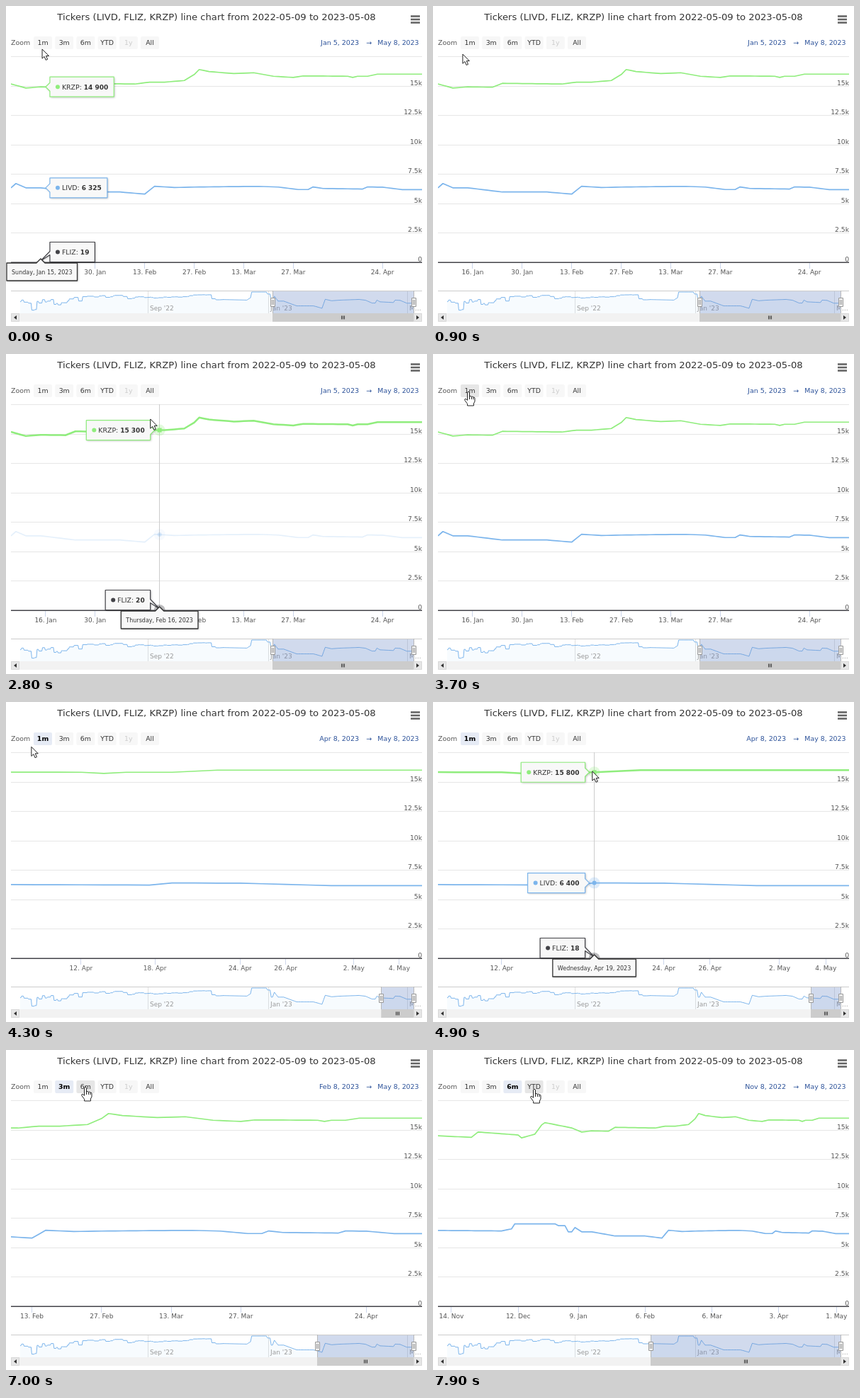
Write an HTML page with a canvas that moves like this. It is 594x452 px and loops after 8000 ms.

```html
<!DOCTYPE html>
<html lang="en">
<head>
<meta charset="utf-8">
<title>Ticker line chart</title>
<style>
html, body { margin: 0; width: 100%; height: 100%; overflow: hidden; background: #fff; }
canvas { display: block; width: 594px; height: 452px; }
</style>
</head>
<body>
<canvas id="c"></canvas>
<script>
const W = 594, H = 452, LOOP = 8000;
const L = 7, R = 587, TOP = 71, BASE = 362, FIRST = -40, LAST = 83;
const NAV_L = 20, NAV_R = 575, NAV_B = 434;
const FONT = '"DejaVu Sans", sans-serif';
const GREEN = '#90ed7d', BLUE = '#7cb5ec', DARK = '#434348';
const canvas = document.getElementById('c');
const g = canvas.getContext('2d');
const dpr = window.devicePixelRatio || 1;
canvas.width = W * dpr;
canvas.height = H * dpr;

const lerp = (a, b, p) => a + (b - a) * p;
const clamp = (v, lo, hi) => Math.max(lo, Math.min(hi, v));

// Calendar: days count from 5 January 2023, a Thursday
const FROM = -58, TO = 123;
const holidays = [-10, -3, 95, 103, 106, 116];
const isOpen = d => ((d + 74) % 7) < 5 && !holidays.includes(d);
const range = (a, b, step = 1) => Array.from({ length: Math.floor((b - a) / step) + 1 }, (_, k) => a + k * step);
const openDays = range(FROM, TO).filter(isOpen);
const fmt = (d, o) => new Date(Date.UTC(2023, 0, 5 + d)).toLocaleDateString('en-US', { timeZone: 'UTC', ...o });
const dayMonth = d => fmt(d, { day: 'numeric' }) + '. ' + fmt(d, { month: 'short' });
const shortDate = d => fmt(d, { month: 'short', day: 'numeric', year: 'numeric' });
const longDate = d => fmt(d, { weekday: 'long' }) + ', ' + shortDate(d);

// Trading-day index; closed days fall just after the day before
function indexOf(d) {
  const before = openDays.filter(o => o <= d).length - 1 + FIRST;
  return isOpen(d) ? before : before + .25;
}

const fortnights = range(11, TO, 14).filter(isOpen);
const views = [
  { at: -9999, from: 0, nav: 376, btn: -1, ticks: fortnights },
  { at: 3850, from: 93, nav: 533, btn: 0, ticks: [97, 103, 109, 111, 117, 119, 123] },
  { at: 5832, from: 34, nav: 439, btn: 1, ticks: fortnights },
  { at: 7050, from: FROM, nav: 307, btn: 2, ticks: range(-52, TO, 28) }
];
views.forEach(v => v.s = indexOf(v.from));

// turning points: index, price
const krzp = [[-40,14480], [-30,14350], [-28,14800], [-16,14550], [-15,14300], [-11,14620], [-9,15400],
  [-8,15600], [-3,15320], [0,15150], [3,14800], [6,14900], [11,14870], [13,15200], [25,15140], [28,15300],
  [31,15300], [35,15440], [37,15945], [38,16370], [40,16200], [45,16030], [49,16100], [53,15800],
  [57,15700], [59,15830], [68,15800], [69,15700], [70,15800], [72,15800], [74,15980], [83,15980]];
const livd = [[-40,6440], [-21,6400], [-18,6570], [-17,7000], [-5,7000], [-4,6850], [-2,6850], [-1,6320],
  [0,6320], [1,6690], [3,6325], [6,6325], [13,5970], [22,5970], [27,5790], [29,6460], [33,6350],
  [37,6390], [50,6450], [54,6390], [58,6180], [60,6180], [61,6400], [63,6270], [71,6220], [72,6400],
  [75,6380], [79,6170], [83,6170]];
// x, y of the overview before the longest zoom range
const early = [[20,418], [32,420], [35,431], [40,431], [43,418], [64,416], [70,422], [84,418], [92,413],
  [106,416], [110,408], [135,411], [158,408], [170,412], [250,411], [266,408], [285,408], [292,415], [307,415]];
// pointer: time, x, y
const track = [[0,51,61], [500,70,40], [1000,35,75], [1500,281,98], [2080,580,98], [2800,204,92],
  [3400,50,52], [4200,50,52], [4450,15,80], [4900,225,98], [5550,87,49], [6400,87,49], [6900,112,51],
  [7350,112,51], [7800,143,54], [8000,143,54]];
// times the pointer enters and leaves the plot
const visits = [[-1, 0], [945, 3110], [4380, 5266]];

// point on a polyline of [key, ...values]
function along(pts, key) {
  const k = Math.max(1, pts.findIndex(q => q[0] >= key));
  const a = pts[k - 1], b = pts[k], p = (key - a[0]) / (b[0] - a[0]);
  return a.map((v, n) => lerp(v, b[n], p)).slice(1);
}
const price = (data, i) => along(data, i)[0];
const pointer = t => along(track, clamp(t, 0, LOOP));
const yOf = v => BASE - v * 0.01663;
const step = v => (R - L) / (LAST - v.s);
const xOf = (i, v) => L + (i - v.s) * step(v);

function rng(seed) {
  return () => (seed = (seed * 16807) % 2147483647) / 2147483647;
}

function text(s, x, y, size, color, align = 'left', weight = '') {
  g.font = `${weight} ${size}px ${FONT}`;
  g.fillStyle = color;
  g.textAlign = align;
  g.fillText(s, x, y);
}

function line(pts, color, width = 1) {
  g.beginPath();
  pts.forEach(p => g.lineTo(p[0], p[1]));
  g.strokeStyle = color;
  g.lineWidth = width;
  g.stroke();
}
const vline = (x, y0, y1, color) => line([[Math.floor(x) + .5, y0], [Math.floor(x) + .5, y1]], color);

function polygon(pts) {
  const path = new Path2D();
  pts.forEach(q => path.lineTo(q[0], q[1]));
  path.closePath();
  return path;
}

function rect(x, y, w, h, fill, stroke) {
  g.fillStyle = fill;
  g.fillRect(x, y, w, h);
  if (!stroke) return;
  g.strokeStyle = stroke;
  g.lineWidth = 1;
  g.strokeRect(x + .5, y + .5, w - 1, h - 1);
}

function disc(x, y, r, color) {
  g.fillStyle = color;
  g.beginPath();
  g.arc(x, y, r, 0, 7);
  g.fill();
}

function header(t, view) {
  text('Tickers (LIVD, FLIZ, KRZP) line chart from 2022-05-09 to 2023-05-08', 297, 19.5, 13.15, '#333', 'center');
  for (const y of [14.5, 19, 23.5]) line([[571, y], [584, y]], '#666', 2.6);
  text('Zoom', L, 55, 9.4, '#555');
  const [mx, my] = pointer(t);
  let hand = false;
  ['1m', '3m', '6m', 'YTD', '1y', 'All'].forEach((b, k) => {
    const x = 39 + k * 30.2, on = view.btn === k, off = b === '1y';
    const over = !off && mx > x && mx < x + 26 && my > 43 && my < 60.5;
    hand = hand || over;
    g.fillStyle = on ? '#e6ebf5' : over ? '#e6e6e6' : '#f7f7f7';
    g.beginPath();
    g.roundRect(x, 43, 26, 18, 2);
    g.fill();
    text(b, x + 13, 55, 9.4, off ? '#ccc' : on ? '#000' : '#333', 'center', on ? 'bold' : '');
  });
  text(shortDate(view.from), 498, 55, 9.5, '#2b5199', 'right');
  text('→', 512, 55, 9.5, '#2b5199', 'center');
  text(shortDate(TO), 582.5, 55, 9.4, '#2b5199', 'right');
  return hand;
}

function axes(prev, view, p) {
  for (let v = 0; v <= 17500; v += 2500) {
    const y = Math.round(yOf(v)) + .5;
    line([[L, y], [R, y]], '#e6e6e6');
  }
  const tick = (d, alpha) => {
    const i = indexOf(d), x = lerp(xOf(i, prev), xOf(i, view), p);
    if (x < L - 1 || x > R + 1) return;
    g.globalAlpha = alpha;
    vline(x, BASE, BASE + 9, '#ccd6eb');
    text(dayMonth(d), clamp(x, 22, 572), 379, 9, '#555', 'center');
  };
  if (p < 1) prev.ticks.filter(d => !view.ticks.includes(d)).forEach(d => tick(d, 1 - p));
  view.ticks.forEach(d => tick(d, prev.ticks.includes(d) ? 1 : Math.max(0, 2 * p - 1)));
  g.globalAlpha = 1;
}

function series(data, color, width, prev, view, p) {
  // days left of a window wait at its first point
  const place = (i, v) => {
    const j = Math.max(i, Math.floor(v.s));
    return [xOf(j, v), yOf(price(data, j))];
  };
  line(range(FIRST, LAST).map(i => {
    const a = place(i, prev), b = place(i, view);
    return [lerp(a[0], b[0], p), lerp(a[1], b[1], p)];
  }), color, width);
}

// Overview: stepped random wiggle first, then the LIVD prices
function overviewPath() {
  const rand = rng(11), pts = [];
  for (let x = NAV_L; x < 300;) {
    const w = 2 + rand() * 5;
    const y = along(early, x)[0] + (rand() - .5) * lerp(7, 0, x / 300);
    pts.push([x, y], [x + w - 1, y]);
    x += w;
  }
  const scale = views.map(v => [v.s, v.nav]).concat([[LAST, NAV_R]]).sort((a, b) => a[0] - b[0]);
  for (let i = FIRST; i <= LAST; i++)
    pts.push([along(scale, i)[0], 404 + (7000 - price(livd, i)) * .019]);
  return pts;
}
const overview = overviewPath();

function navigator(x0) {
  const w = NAV_R - x0;
  line([[L, 402.5], [R, 402.5]], '#ccc');
  for (const x of [200, 370, 566]) vline(x, 403, NAV_B, '#e0e0e0');
  g.fillStyle = 'rgba(124,181,236,.06)';
  g.fill(polygon([...overview, [NAV_R, NAV_B], [NAV_L, NAV_B]]));
  line(overview, BLUE);
  text("Sep '22", 203, 430, 9, '#999');
  text("Jan '23", 373, 430, 9, '#999');
  text('M…', 569, 430, 9, '#999');
  rect(x0, 403, w, 31, 'rgba(102,133,194,.3)');
  rect(L, NAV_B, R - L, 12, '#f2f2f2');
  rect(x0, NAV_B, w, 12, '#ccc');
  for (const [x, d] of [[13, -2], [581, 2]]) {
    rect(x - 6, NAV_B, 12, 12, '#e6e6e6', '#d8d8d8');
    g.fillStyle = '#333';
    g.fill(polygon([[x + d, 440], [x - d, 437], [x - d, 443]]));
  }
  for (const d of [-2, 0, 2]) vline(x0 + w / 2 + d, 437.5, 442.5, '#333');
  for (const x of [Math.round(x0), NAV_R]) {
    vline(x, 402, NAV_B, '#b8b8b8');
    rect(x - 3, 412, 7, 13, '#f2f2f2', '#999');
    vline(x - 1, 415, 422, '#999');
    vline(x + 1, 415, 422, '#999');
  }
}

function panel(path, border, width) {
  g.save();
  g.shadowColor = 'rgba(0,0,0,.3)';
  g.shadowBlur = 3 * dpr;
  g.shadowOffsetX = g.shadowOffsetY = dpr;
  g.fillStyle = '#f8f8f8';
  g.fill(path);
  g.restore();
  g.strokeStyle = border;
  g.lineWidth = width;
  g.stroke(path);
}

function tag(name, value, color, x, y) {
  const label = name + ': ';
  const num = String(value).replace(/\B(?=(\d{3})+$)/g, ' ');
  g.font = `9.4px ${FONT}`;
  const lw = g.measureText(label).width;
  g.font = `bold 9px ${FONT}`;
  const w = 17 + lw + g.measureText(num).width + 8;
  const mid = Math.min(y, 347.5), low = mid < y;
  const left = x - 13 - w >= 0;
  const bx = left ? x - 13 - w : x + 13;
  const edge = left ? bx + w : bx, tip = left ? edge + 6 : edge - 6;
  const [a, b, c, d] = [[bx, mid - 14], [bx + w, mid - 14], [bx + w, mid + 14], [bx, mid + 14]];
  const notch = low ? [[edge, mid - 1], [x, BASE - 2], [edge, mid + 4]]
    : [[edge, mid - 6], [tip, mid], [edge, mid + 6]];
  panel(polygon(left ? [a, b, ...notch, c, d] : [a, b, c, d, ...notch.reverse()]), color, 1.2);
  disc(bx + 11, mid, 3, color);
  text(label, bx + 17, mid + 3.5, 9.4, '#333');
  text(num, bx + 17 + lw, mid + 3.5, 9, '#333', 'left', 'bold');
}

function dateTag(i, x) {
  const s = longDate(openDays[i - FIRST]);
  g.font = `8px ${FONT}`;
  const w = g.measureText(s).width + 14;
  const bx = clamp(x - w / 2, 1, W - w - 1), end = bx + w;
  const notch = [[x - 6, 363], [x, 357], [x + 6, 363]].map(q => [clamp(q[0], bx, end), q[1]]);
  panel(polygon([[bx, 363], ...notch, [end, 363], [end, 388], [bx, 388]]), '#333', 1.3);
  text(s, bx + 7, 378.5, 8, '#333');
}

function hover(t, view) {
  const visit = visits.find(([a, b]) => t >= a && t < b + 550);
  if (!visit) return null;
  const now = Math.min(t, visit[1]);
  const mx = pointer(now - 30)[0];
  const i = clamp(Math.round((mx - L) / step(view) + view.s), Math.ceil(view.s), LAST);
  const inside = t > visit[0] && t < visit[1];
  return {
    i, inside, x: xOf(i, view),
    green: Math.round(price(krzp, i) / 5) * 5,
    blue: Math.round(price(livd, i) / 5) * 5,
    dim: inside && view === views[0],
    back: view === views[0] && pointer(now)[0] < mx,
    alpha: clamp((visit[1] + 550 - t) / 100, 0, 1)
  };
}

function tooltip(h) {
  g.globalAlpha = h.alpha;
  tag('KRZP', h.green, GREEN, h.x, yOf(h.green));
  if (!h.back) tag('LIVD', h.blue, BLUE, h.x, yOf(h.blue));
  tag('FLIZ', h.i < 15 ? 19 : h.i < 60 ? 20 : 18, DARK, h.x, BASE);
  dateTag(h.i, h.x);
  g.globalAlpha = 1;
}

function markers(h) {
  const gy = yOf(h.green), by = yOf(h.blue);
  disc(h.x, gy, 8, 'rgba(144,237,125,.25)');
  rect(h.x - 3, gy - 3, 6, 6, GREEN);
  g.globalAlpha = h.dim ? .25 : 1;
  disc(h.x, by, 8, 'rgba(124,181,236,.25)');
  disc(h.x, by, 3, BLUE);
  g.globalAlpha = 1;
  disc(h.x, BASE, 8, 'rgba(67,67,72,.35)');
}

const arrow = new Path2D('M0 0V13.2L3 10.4L5.2 15.4L7.6 14.3L5.4 9.5H9.4Z');
const palm = new Path2D('M-1.5 1.2Q0 -.9 1.5 1.2V7Q3 5.7 4.4 7.4Q5.8 6.4 7 8.2Q8.4 7.4 9 9.4V14L7.4 17V20H-1.4V17.5L-5.2 12.2Q-5.6 10 -3.6 10.4L-1.5 12.4Z');
const knuckles = new Path2D('M1.5 7V11M4.4 7.6V11M7 8.4V11.2');

function drawPointer(t, hand) {
  const [x, y] = pointer(t), shape = hand ? palm : arrow;
  g.save();
  g.translate(x, y + (hand ? 1 : 0));
  g.fillStyle = '#fff';
  g.strokeStyle = '#222';
  g.lineWidth = 1;
  g.fill(shape);
  g.stroke(shape);
  if (hand) g.stroke(knuckles);
  g.restore();
}

function draw(t) {
  g.setTransform(dpr, 0, 0, dpr, 0, 0);
  g.lineJoin = 'round';
  rect(0, 0, W, H, '#fff');
  const n = views.findLastIndex(v => t >= v.at);
  const view = views[n], prev = views[Math.max(0, n - 1)];
  const p = .5 - Math.cos(Math.PI * clamp((t - view.at) / 500, 0, 1)) / 2;
  const hand = header(t, view);
  axes(prev, view, p);
  const h = hover(t, view), inside = h && h.inside;
  if (inside) vline(h.x, TOP, BASE, '#ccc');

  g.save();
  g.beginPath();
  g.rect(L, TOP, R - L, BASE + 2 - TOP);
  g.clip();
  g.globalAlpha = inside && h.dim ? .2 : 1;
  series(livd, BLUE, 1.7, prev, view, p);
  g.globalAlpha = 1;
  line([[L, BASE + .3], [R, BASE + .3]], DARK, 1.6);
  series(krzp, GREEN, inside ? 2.5 : 1.7, prev, view, p);
  if (inside) markers(h);
  g.restore();

  for (let v = 0; v <= 15000; v += 2500)
    text(v ? v / 1000 + 'k' : '0', R, Math.round(yOf(v)) - 1.5, 9.2, '#555', 'right');
  navigator(lerp(prev.nav, view.nav, p));
  if (h) tooltip(h);
  drawPointer(t, hand);
}

const start = performance.now();
function frame() {
  draw((performance.now() - start) % LOOP);
  requestAnimationFrame(frame);
}
draw(0);
requestAnimationFrame(frame);
</script>
</body>
</html>
```
